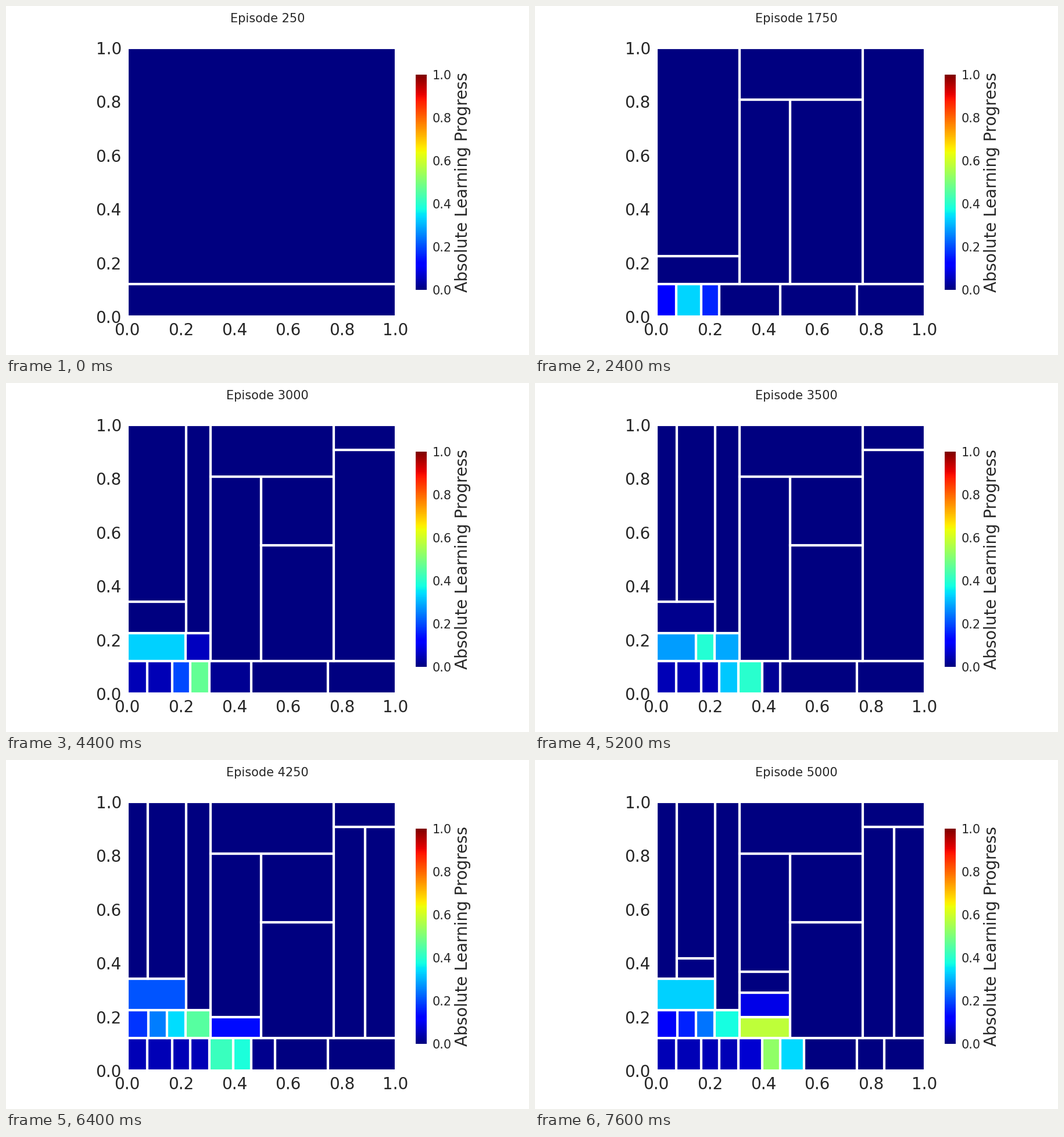
Write a matplotlib script that moves like this. It is 900x600 px and loops after 8 s.

```python
import math

import matplotlib.pyplot as plt
from matplotlib.animation import FuncAnimation
from matplotlib.cm import ScalarMappable
from matplotlib.colors import Normalize
from matplotlib.patches import Rectangle

FRAMES, INTERVAL = 20, 400
INK = "0.15"
X, Y = 0, 1

# Each cut runs through one point and halts at the walls around it.
# The axis names the coordinate that is cut; the order is that of the splits.
CUTS = [
    (Y, .5, .1212), (X, .3106, .5), (X, .7695, .5),
    (X, .4621, .06), (X, .2348, .06), (X, .0745, .06),
    (Y, .5, .8074), (Y, .1, .225), (X, .7478, .06), (X, .1677, .06),
    (X, .499, .5), (Y, .9, .907), (X, .2197, .5), (Y, .6, .5509),
    (X, .2165, .15), (X, .3052, .06), (Y, .1, .341), (X, .0768, .5),
    (X, .395, .06), (X, .1483, .15), (X, .5509, .06), (X, .8874, .5),
    (Y, .4, .199), (X, .079, .15), (Y, .4, .29), (Y, .15, .4167),
    (X, .8496, .06), (Y, .4, .368),
]


def growth(frame):
    """Share of the whole run, slightly faster at the start."""
    return (frame / (FRAMES - 1)) ** 0.91


def split(boxes, axis, *point):
    for i, box in enumerate(boxes):
        if all(lo < p < hi for (lo, hi), p in zip(box, point)):
            (lo, hi), cut = box[axis], point[axis]
            parts = [list(box), list(box)]
            parts[0][axis], parts[1][axis] = (lo, cut), (cut, hi)
            return boxes[:i] + parts + boxes[i + 1:]
    return boxes


def regions(frame):
    boxes = [[(0, 1), (0, 1)]]
    for cut in CUTS[:int(1.56 + (len(CUTS) - 1) * growth(frame))]:
        boxes = split(boxes, *cut)
    return boxes


def progress(box, frame):
    """A learning front leaves the origin; its wake lasts longer higher up."""
    x, y = (sum(side) / 2 for side in box)
    lead = 0.465 * growth(frame) - math.hypot(x, 1.5 * y)
    width, floor = (1.2 * y, 0.05) if lead > 0 else (0.06, 0)
    return max(floor, (0.24 + 0.85 * x) * math.exp(-(lead / width) ** 2))


plt.rcParams.update({
    "font.family": "DejaVu Sans", "text.color": INK, "axes.labelcolor": INK,
    "xtick.labelcolor": INK, "ytick.labelcolor": INK,
})
fig, ax = plt.subplots(figsize=(9, 6), dpi=100, facecolor="white")
ax.set(xlim=(0, 1), ylim=(0, 1), aspect="equal")
ax.tick_params(labelsize=20, left=False, bottom=False)
ax.spines[:].set_visible(False)

jet = plt.get_cmap("jet")
bar = fig.colorbar(ScalarMappable(Normalize(0, 1), jet), ax=ax, shrink=0.8)
bar.set_label("Absolute Learning Progress", fontsize=20)
bar.ax.tick_params(labelsize=15, right=False)
bar.outline.set_visible(False)
title = fig.suptitle("", fontsize=15)


def draw(frame):
    title.set_text(f"Episode {250 * (frame + 1)}")
    for patch in list(ax.patches):
        patch.remove()
    for box in regions(frame):
        (x0, x1), (y0, y1) = box
        ax.add_patch(Rectangle((x0, y0), x1 - x0, y1 - y0, lw=3,
                               fc=jet(progress(box, frame)), ec="white"))
    return [title, *ax.patches]


anim = FuncAnimation(fig, draw, frames=FRAMES, interval=INTERVAL,
                     init_func=lambda: draw(0), repeat=True, repeat_delay=0)
plt.show()
```
